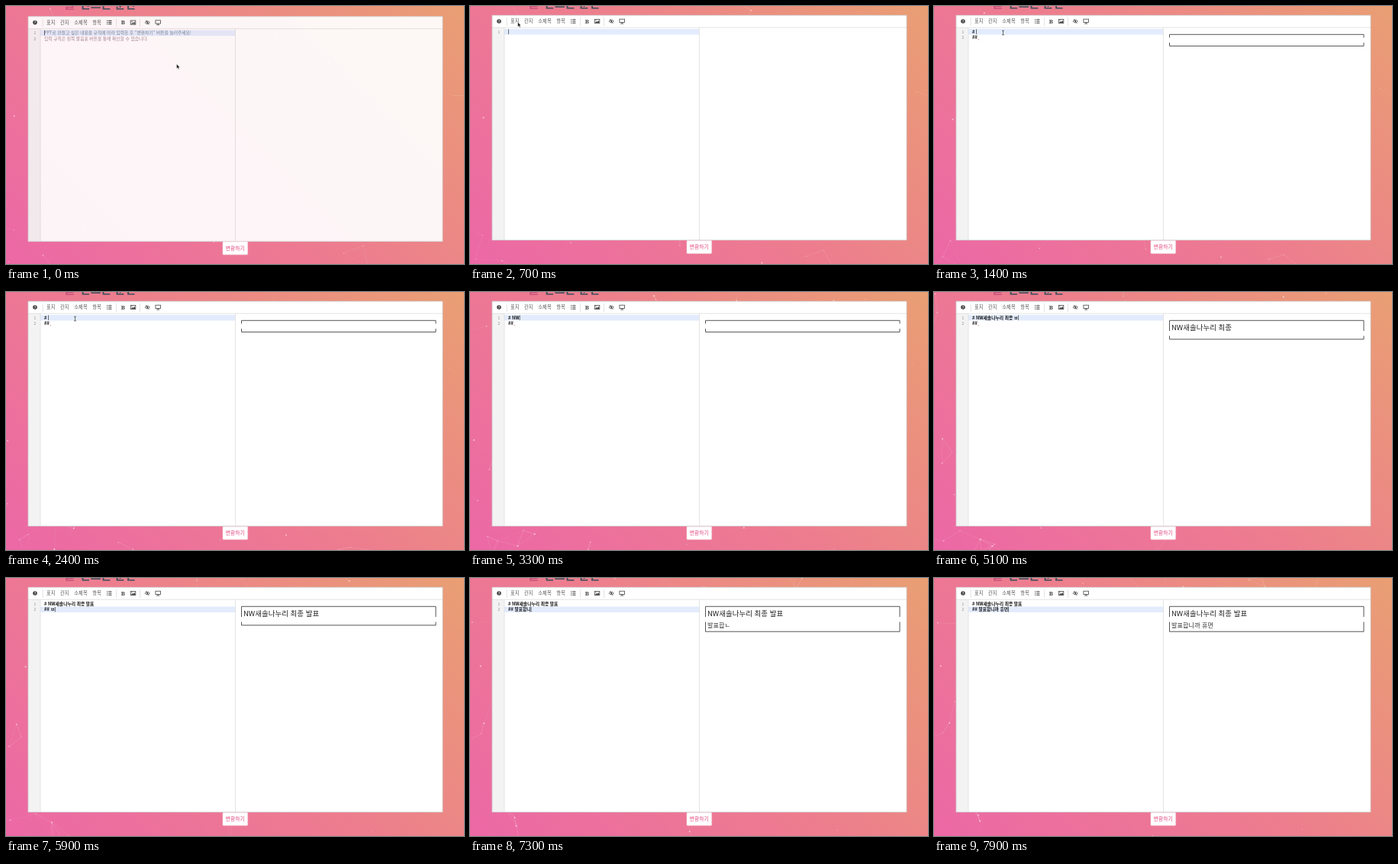
An HTML page with a canvas for the animation above (8000 ms loop, 600 px wide and 338 px high).

```html
<!DOCTYPE html>
<html lang="ko">
<head>
<meta charset="utf-8">
<title>발표 자료 편집기</title>
<style>
  html, body { margin: 0; width: 100%; height: 100%; overflow: hidden; }
  body { background: linear-gradient(45deg, #ec68a6 0%, #ed7d8e 50%, #e99f73 100%); }
  canvas, svg { position: absolute; inset: 0; width: 100%; height: 100%; display: block; }
  text { font-family: "Noto Sans CJK KR", "Noto Sans KR", "Noto Sans CJK", sans-serif; white-space: pre; }
  .menu { font-size: 6.3px; fill: #555; }
  .code { font-size: 5.75px; fill: #111; font-weight: 700; }
  .hint .code { font-weight: 400; }
  .num { font-size: 5px; fill: #888; text-anchor: middle; }
  .rule { fill: none; stroke: #ddd; stroke-width: .8; }
  .frame { fill: none; stroke: #555; stroke-width: 1; }
  .ink { fill: #444; }
  .line { fill: none; stroke: #444; stroke-width: .8; }
</style>
</head>
<body>
<canvas id="net" width="600" height="338"></canvas>
<svg viewBox="0 0 600 338" preserveAspectRatio="none">
  <g id="page">
    <text x="76" y="1.6" font-size="16" font-weight="700" fill="#c9557c">를</text>
    <text x="97" y="1.6" font-size="15" font-weight="700" fill="#45505c">만드는 순간</text>

    <g id="panel">
      <rect x="29" y="12" width="543" height="295" fill="#fff"/>
      <rect x="29" y="28" width="16" height="278.5" fill="#f3f3f3"/>
      <rect id="active" x="45" width="255" height="7.5" fill="#e3ecfd"/>
      <path class="rule" d="M29 28.2H572M45 28V306.5M300.5 28V306.5M48.3 15V26M144.5 15V26M175.5 15V26"/>
      <rect class="rule" x="29" y="12.2" width="543" height="294.5" style="stroke:#ccc"/>
    </g>

    <circle class="ink" cx="38" cy="20" r="2.8"/>
    <text x="38" y="21.8" font-size="4.8" font-weight="700" fill="#fff" text-anchor="middle">?</text>
    <g class="menu">
      <text x="53" y="22.3">표지</text>
      <text x="71" y="22.3">간지</text>
      <text x="89.3" y="22.3">소제목</text>
      <text x="113.3" y="22.3">항목</text>
    </g>
    <path class="line" style="stroke-width:1.1" d="M132 17.8h1.2M132 20h1.2M132 22.2h1.2M134.2 17.8h4.2M134.2 20h4.2M134.2 22.2h4.2"/>
    <text x="153.2" y="22.7" font-size="7.6" font-weight="700" class="ink" text-anchor="middle" style="font-family:'Noto Serif',serif">B</text>
    <rect class="line" x="163.2" y="17.4" width="6.6" height="5.2"/>
    <path class="ink" d="M164 22l1.6-2 1 .9 1.6-2.1 1.3 3.2z"/>
    <circle class="ink" cx="165" cy="18.9" r=".6"/>
    <path class="line" d="M182 20q3.2-3.8 6.4 0q-3.2 3.8-6.4 0M183.3 17.2l4 5.6"/>
    <circle class="ink" cx="185.2" cy="20" r="1.1"/>
    <rect class="line" x="195.9" y="17.2" width="6.6" height="4.2"/>
    <path class="line" d="M199.2 21.4v1.6M197.2 23.1h4"/>

    <text class="num" x="38" y="35.8">1</text>
    <text class="num" id="num2" x="38" y="43.3">2</text>
    <g class="hint" id="hint">
      <text class="code" x="50" y="35.8" style="fill:#788694">PPT로 만들고 싶은 내용을 규칙에 따라 입력한 후 "변환하기" 버튼을 눌러주세요!</text>
      <text class="code" x="50" y="43.3" style="fill:#a5828f">입력 규칙은 왼쪽 물음표 버튼을 통해 확인할 수 있습니다.</text>
    </g>
    <text class="code" id="row1" x="50" y="35.8"></text>
    <text class="code" id="row2" x="50" y="43.3"></text>
    <path id="tail" d="M57.6 43.9h1.6" stroke="#c33" stroke-width=".8" stroke-dasharray=".8 .4"/>
    <rect id="caret" width=".7" height="6.6" fill="#333"/>

    <g id="view">
      <path class="frame" id="top"/>
      <path class="frame" id="bottom"/>
      <text id="title" x="311" y="49.7" font-size="9.5" fill="#222"></text>
      <text id="sub" x="311" y="64.6" font-size="8.2" fill="#333"></text>
    </g>

    <rect x="284" y="307.2" width="32.6" height="17" rx=".8" fill="#fff" stroke="#f3d5de" stroke-width=".6"/>
    <text x="300.3" y="318.2" font-size="6.8" fill="#e4417c" text-anchor="middle">변환하기</text>
  </g>
  <path id="arrow" d="M0 0V6l1.4-1.2 1 2.2 1-.5-1-2.1H4.2z" fill="#111" stroke="#fff" stroke-width=".4"/>
  <path id="beam" d="M-1.5-3q1.5 0 1.5 1v4q0 1-1.5 1M1.5-3q-1.5 0-1.5 1M1.5 3q-1.5 0-1.5-1" fill="none" stroke="#333" stroke-width=".7"/>
</svg>
<script>
const LOOP = 8000, STEP = 100, LAG = 120;
const $ = id => document.getElementById(id);
const show = (id, on) => { $(id).style.display = on ? '' : 'none'; };

// Hangul composition, one keystroke at a time
const CHO = 'ㄱㄲㄴㄷㄸㄹㅁㅂㅃㅅㅆㅇㅈㅉㅊㅋㅌㅍㅎ';
const JONG = ' ㄱㄲㄳㄴㄵㄶㄷㄹㄺㄻㄼㄽㄾㄿㅀㅁㅂㅄㅅㅆㅇㅈㅊㅋㅌㅍㅎ';
const SPLIT = { 9: 8, 10: 8, 11: 8, 14: 13, 15: 13, 16: 13, 19: 18 };
const syllable = (c, v, f) => String.fromCharCode(0xAC00 + (c * 21 + v) * 28 + f);
const parts = ch => {
  const n = ch.charCodeAt(0) - 0xAC00;
  return n < 0 || n > 11171 ? null : [Math.floor(n / 588), Math.floor(n % 588 / 28), n % 28];
};

function keystrokes(text) {
  const out = [];
  let done = '', prev = null;
  for (const ch of text) {
    const p = parts(ch);
    if (p) {
      const [c, v, f] = p;
      const joined = prev && !prev[2] ? JONG.indexOf(CHO[c]) : -1;
      out.push(joined > 0 ? done.slice(0, -1) + syllable(prev[0], prev[1], joined) : done + CHO[c]);
      if (v in SPLIT) out.push(done + syllable(c, SPLIT[v], 0));
      out.push(done + syllable(c, v, 0));
      if (f) out.push(done + ch);
    } else {
      out.push(done + ch);
    }
    done += ch;
    prev = p;
  }
  return out;
}

// Each run spreads its keystrokes evenly between two times
function schedule(runs) {
  const keys = [];
  let done = '';
  for (const [from, to, text] of runs) {
    const states = keystrokes(text);
    states.forEach((s, i) => keys.push([from + (to - from) * i / Math.max(1, states.length - 1), done + s]));
    done += text;
  }
  return t => keys.reduce((s, [at, value]) => at <= t ? value : s, '');
}
const typed1 = schedule([[3200, 3290, 'NW'], [3360, 4250, '새솔나누리'], [4370, 5380, ' 최종 발표']]);
const typed2 = schedule([[5820, 7250, '발표합니'], [7340, 7760, '까 휴먼']]);

// Pointer path: time, x, y
const PATH = [[0, 223.5, 76], [200, 215, 72], [750, 59, 20], [950, 59, 20], [1350, 90.5, 35]];
function pointer(t) {
  let i = 0;
  while (i < PATH.length - 2 && t > PATH[i + 1][0]) i++;
  const [a, ax, ay] = PATH[i], [b, bx, by] = PATH[i + 1];
  const k = Math.min(1, (t - a) / (b - a)), e = k * k * (3 - 2 * k);
  return [ax + (bx - ax) * e, ay + (by - ay) * e];
}

// Drifting particle network
let seed = 29;
const rnd = () => (seed = seed * 16807 % 2147483647) / 2147483647;
const dots = Array.from({ length: 95 }, () => ({
  x: rnd() * 640, y: rnd() * 378, vx: (rnd() - .5) * 22, vy: (rnd() - .5) * 22, r: .4 + rnd() * .7
}));
const wrap = (n, size) => ((n % size) + size) % size - 20;
const ctx = $('net').getContext('2d');
function drawNet(t) {
  ctx.clearRect(0, 0, 600, 338);
  const pts = dots.map(d => [wrap(d.x + d.vx * t / 1000, 640), wrap(d.y + d.vy * t / 1000, 378), d.r]);
  ctx.lineWidth = .6;
  pts.forEach(([x, y, r], i) => {
    ctx.fillStyle = 'rgba(255,255,255,.6)';
    ctx.beginPath();
    ctx.arc(x, y, r, 0, 7);
    ctx.fill();
    for (const [u, v] of pts.slice(i + 1)) {
      const d = Math.hypot(x - u, y - v);
      if (d > 44) continue;
      ctx.strokeStyle = `rgba(255,255,255,${.42 * (1 - d / 44)})`;
      ctx.beginPath();
      ctx.moveTo(x, y);
      ctx.lineTo(u, v);
      ctx.stroke();
    }
  });
}

function drawEditor(t) {
  const ready = t >= 900;
  const a = typed1(t), b = typed2(t);
  const row = (ready && t < 1200) || t >= 5550 ? 2 : 1;
  show('hint', t < 500);
  show('num2', t < 500 || ready);
  $('row1').textContent = ready ? '# ' + a : '';
  $('row2').textContent = ready ? '## ' + b : '';
  show('tail', ready && !b);
  $('active').setAttribute('y', row === 1 ? 30 : 37.5);

  const busy = t >= 3200 || t < 200;
  show('caret', busy || (t - 1300 + 10600) % 1060 < 530);
  $('caret').setAttribute('x', 50.2 + (ready ? $('row' + row).getComputedTextLength() : 0));
  $('caret').setAttribute('y', row === 1 ? 30.4 : 37.9);
}

function drawView(t) {
  const title = typed1(t), sub = typed2(t);
  show('view', t >= 900);
  const y1 = title ? 51 : 41.5, y2 = y1 + 6.5, y3 = y2 + (sub ? 12.7 : 4.4);
  $('top').setAttribute('d', `M308.5 ${y1}V37.3H563V${y1}`);
  $('bottom').setAttribute('d', `M308.5 ${y2}V${y3}H563V${y2}`);
  $('title').textContent = title;
  $('sub').textContent = sub;
}

function draw(t) {
  const settle = Math.max(0, 1 - t / 200);
  $('page').setAttribute('transform', `translate(0 ${1.6 * settle})`);
  $('panel').setAttribute('opacity', 1 - .07 * settle);
  drawNet(t);
  drawEditor(t);
  drawView(t - LAG);
  const [x, y] = pointer(t);
  const text = y > 29 && x < 300 && t > 1000;
  for (const id of ['arrow', 'beam']) $(id).setAttribute('transform', `translate(${x} ${y})`);
  show('arrow', !text);
  show('beam', text && t < 3200);
}

const start = performance.now();
function tick() {
  const t = (performance.now() - start) % LOOP;
  draw(Math.floor(t / STEP) * STEP);
  requestAnimationFrame(tick);
}
tick();
</script>
</body>
</html>
```
